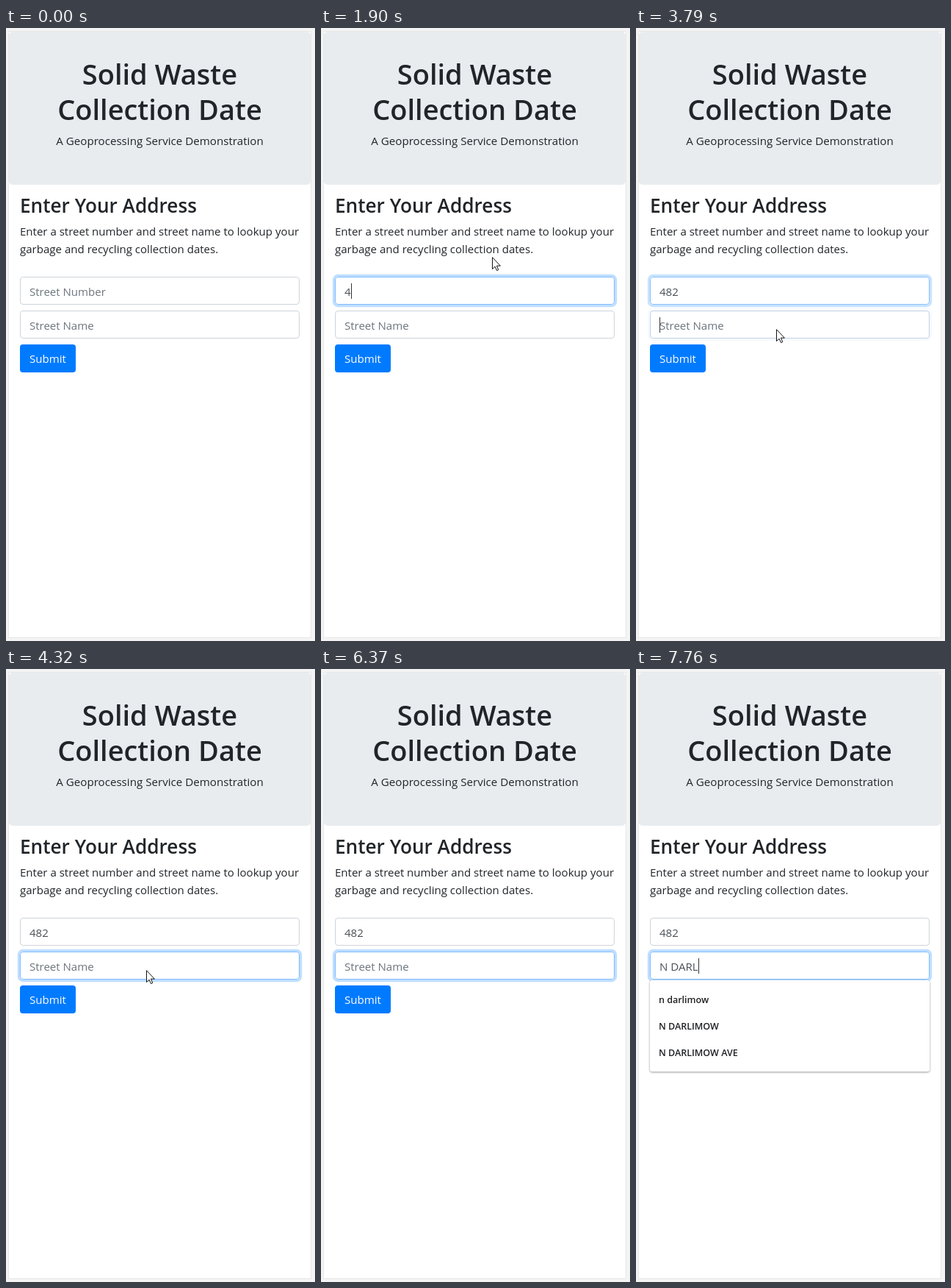
An HTML page that plays this animation: 421 px wide and 833 px high, repeating every 8 s.

```html
<!DOCTYPE html>
<html lang="en">
<head>
<meta charset="utf-8">
<title>Collection date form</title>
<style>
html, body { margin: 0; width: 100%; height: 100%; overflow: hidden; background: #f4f4f4; }
svg { display: block; width: 421px; height: 833px; }
text { font: 15.05px "Open Sans", "Noto Sans", sans-serif; fill: #212529; white-space: pre; }
.mid { font-size: 15.15px; text-anchor: middle; }
.h1 { font-size: 38px; font-weight: 600; }
.h3 { font-size: 26.2px; font-weight: 600; }
.list text { font-size: 12.5px; font-weight: 600; fill: #202124; }
.list rect { filter: drop-shadow(0 1px 1.5px rgba(0, 0, 0, .4)); }
.box { fill: #fff; }
.ring { fill: none; stroke: #bfdeff; stroke-width: 3.2; }
</style>
</head>
<body>
<svg viewBox="0 0 421 833">
  <rect x="3.5" y="4.5" width="412" height="824" fill="#fff" stroke="#e7e7e7"/>
  <rect x="4" y="5" width="411" height="208" rx="4.8" fill="#e9ecef"/>
  <text class="mid h1" x="209.5" y="77">Solid Waste</text>
  <text class="mid h1" x="209.5" y="125">Collection Date</text>
  <text class="mid" x="209.5" y="159">A Geoprocessing Service Demonstration</text>
  <text class="h3" x="19" y="251">Enter Your Address</text>
  <text x="19" y="282">Enter a street number and street name to lookup your</text>
  <text x="19" y="306">garbage and recycling collection dates.</text>
  <rect x="19" y="430" width="76" height="38" rx="4" fill="#007bff"/>
  <text x="32" y="455" style="fill:#fff">Submit</text>
  <g id="fields"></g>
  <g class="list" id="list">
    <rect x="19" y="423" width="381" height="124" rx="3" fill="#fff"/>
    <text x="31" y="454">n darlimow</text>
    <text x="31" y="490">N DARLIMOW</text>
    <text x="31" y="526">N DARLIMOW AVE</text>
  </g>
  <path id="mouse" d="M.5 .7V16.6L4.1 13.2 6.6 18.6 8.8 17.6 6.4 12.2H11.4Z" fill="#fff" stroke="#111"/>
</svg>
<script>
// The screen refreshes in coarse ticks; all times below are in ticks.
const LOOP = 8000, TICK = 171.9, BLINK = 3;
const NUMBER_CLICK = 5, NAME_CLICK = 22, NAME_TYPING = 39;

const $ = id => document.getElementById(id);
const clamp = v => Math.min(1, Math.max(0, v));
const ease = k => k * k * (3 - 2 * k);
const mix = (a, b, k) => a + (b - a) * k;

function makeField({ top, hint, value, click, blur, typing, pace }) {
  const g = document.createElementNS("http://www.w3.org/2000/svg", "g");
  g.innerHTML = `
    <rect class="ring" x="17.4" y="${top - 1.6}" width="384.2" height="41.2" rx="5.6"/>
    <rect class="box" x="19.5" y="${top + .5}" width="380" height="37" rx="3.6"/>
    <text x="32" y="${top + 26}"></text>
    <rect y="${top + 9}" width="1" height="21" fill="#333"/>`;
  $("fields").append(g);
  const [ring, box, label, caret] = g.children;
  const fade = ticks => ticks < 0 ? 0 : clamp(ticks + .15);

  return n => {
    const focus = fade(n - click) - fade(n - blur);
    ring.style.opacity = focus;
    box.style.stroke = `rgb(${mix(206, 128, focus)},${mix(212, 189, focus)},${mix(218, 255, focus)})`;

    const count = n < typing ? 0 : Math.min(value.length, 1 + Math.floor((n - typing) / pace));
    label.textContent = value.slice(0, count) || hint;
    label.style.fill = count ? "#495057" : "#6c757d";

    // Each click or key press restarts the blink.
    const lastInput = count ? typing + (count - 1) * pace : click;
    const lit = n >= click && n < blur && Math.floor((n - lastInput) / BLINK) % 2 === 0;
    caret.style.opacity = lit ? 1 : 0;
    caret.setAttribute("x", 32 + (count ? Math.ceil(label.getComputedTextLength()) : 0));
  };
}

const fields = [
  makeField({ top: 338, hint: "Street Number", value: "482",
    click: NUMBER_CLICK, blur: NAME_CLICK, typing: 11, pace: 1 }),
  makeField({ top: 384, hint: "Street Name", value: "N DARL",
    click: NAME_CLICK, blur: Infinity, typing: NAME_TYPING, pace: 1.2 })
];

// The pointer enters, visits each field, then leaves at the right edge.
const entry = { x: 112, y: 605, tick: 1 };
const moves = [
  { from: 1, to: 4, x: 86, y: 362 },
  { from: 5, to: 8, x: 233, y: 311 },
  { from: 15, to: 18, x: 191, y: 409 },
  { from: 26, to: 28, x: 202, y: 490 },
  { from: 31, to: 34, x: 422, y: 432 }
];

function drawMouse(n) {
  let { x, y } = entry;
  for (const m of moves) {
    const k = ease(clamp((n - m.from) / (m.to - m.from)));
    x = mix(x, m.x, k);
    y = mix(y, m.y, k);
  }
  $("mouse").style.display = n < entry.tick ? "none" : "";
  $("mouse").setAttribute("transform", `translate(${Math.round(x)} ${Math.round(y)})`);
}

const begin = performance.now();

function draw(now) {
  const n = Math.floor(Math.max(0, now - begin) % LOOP / TICK);
  fields.forEach(update => update(n));
  $("list").style.display = n < NAME_TYPING ? "none" : "";
  drawMouse(n);
  requestAnimationFrame(draw);
}
draw(begin);
</script>
</body>
</html>
```
